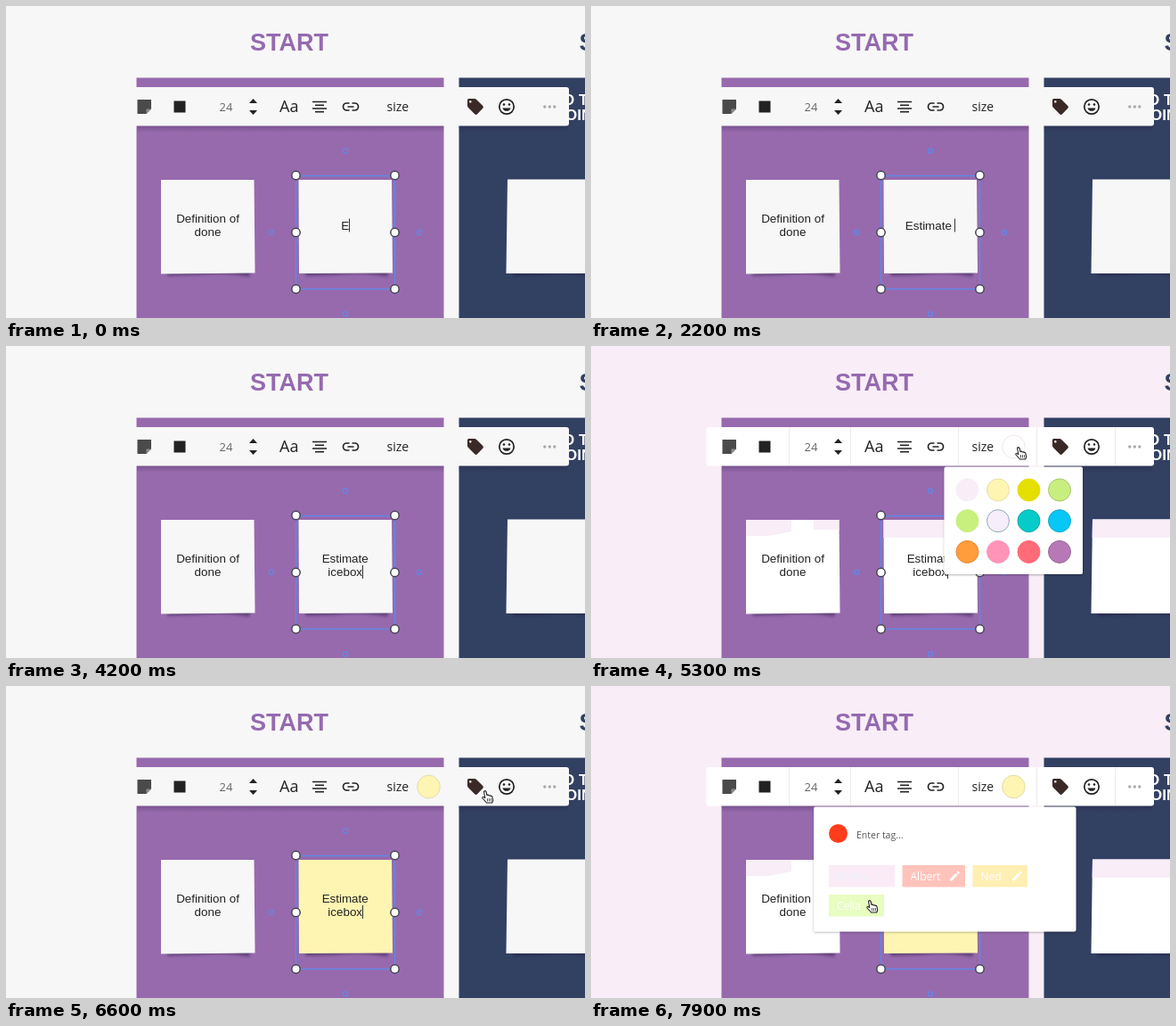
These frames come from a looping animation (650 by 350 pixels, 8 s). An HTML page:

```html
<!DOCTYPE html>
<html lang="en">
<head>
<meta charset="utf-8">
<title>Sticky notes board</title>
<style>
  html, body { margin: 0; width: 100%; height: 100%; overflow: hidden; background: #f7f7f7; }
  svg { display: block; width: 650px; height: 350px; }
  .note-text { font: 13.4px "Liberation Sans", Arial, sans-serif; fill: #222; text-anchor: middle; white-space: pre; }
  .heading { font: bold 27px "Liberation Sans", Arial, sans-serif; }
  .prompt { font: bold 17px "Liberation Sans", Arial, sans-serif; fill: #fff; }
  .ui { font-family: "Open Sans", "Noto Sans", sans-serif; }
  .tag { font-size: 12px; font-weight: 500; }
</style>
</head>
<body>
<svg viewBox="0 0 650 350" xmlns="http://www.w3.org/2000/svg">
  <defs>
    <filter id="soft" x="-20%" y="-100%" width="140%" height="300%"><feGaussianBlur stdDeviation="1.8"/></filter>
    <filter id="lift" x="-10%" y="-10%" width="120%" height="120%">
      <feDropShadow dx="0" dy="1" stdDeviation="1.3" flood-opacity=".3"/>
    </filter>
    <linearGradient id="fall" x2="0" y2="1">
      <stop stop-color="#201030" stop-opacity=".26"/><stop offset="1" stop-color="#201030" stop-opacity="0"/>
    </linearGradient>
    <path id="pencil" d="M-5 5v-2.3l6.5-6.5 2.3 2.3L-2.7 5zM2.3-4.5l1-1q.6-.5 1.2 0l1 1q.5.6 0 1.2l-1 1z"/>
    <path id="noteShadow" d="M4 98H102L99 109Q70 103 40 107L8 108Z" fill="#241238" opacity=".42" filter="url(#soft)"/>
  </defs>

  <rect id="page" width="650" height="350"/>
  <text class="heading" x="274" y="50" fill="#956ab0">START</text>
  <text class="heading" x="643.5" y="50" fill="#324062">STOP</text>
  <rect x="146.5" y="80.5" width="345" height="270" fill="#976aae"/>
  <rect x="508.5" y="80.5" width="142" height="270" fill="#324062"/>
  <text class="prompt" x="625" y="111">O T</text>
  <text class="prompt" x="628" y="128">OIN</text>

  <use href="#noteShadow" x="174" y="195"/>
  <use href="#noteShadow" x="329" y="195"/>
  <use href="#noteShadow" x="562" y="195"/>
  <g class="paper">
    <path d="M174 195H278.5L279.5 299.5 174 300.5Z"/>
    <path d="M563 194.5H660V300H561.5Z"/>
  </g>
  <path id="activeNote" d="M328.5 195H433L434 299.5 329 300Z"/>
  <g id="tint" fill="#f9edf7">
    <path d="M174 195H225V208L200 213H174Z"/>
    <path d="M250 195H278.5V206H250Z"/>
    <path id="activeTint" d="M328.5 195H397V215H328.5Z"/>
    <path d="M563 194.5H650V215H562.7Z"/>
  </g>
  <text class="note-text" x="226.5" y="243">Definition of</text>
  <text class="note-text" x="226.5" y="258">done</text>
  <text class="note-text" id="line1" x="380.7"></text>
  <text class="note-text" id="line2" x="380.7" y="258"></text>
  <path id="caret" stroke="#333"/>

  <g id="selection" fill="none" stroke="#5b8aea">
    <rect x="325.5" y="190.5" width="111" height="127" stroke-width="1.3"/>
  </g>

  <g id="shadow" fill="url(#fall)">
    <rect x="147" y="134" width="344.5" height="8"/>
    <rect x="508.5" y="134" width="122" height="8"/>
  </g>
  <rect class="paper" x="129.500" y="91" width="502.500" height="43.500" rx="3"/>
  <path id="dividers" d="M222.500 91V134M291.500 91V134M412.500 91V134M500.500 91V134M588.500 91V134" stroke="#eeeaee"/>
  <g fill="#222">
    <path d="M147.500 105H163V115.500L157.500 121H147.500Z" fill="#4a4a4a"/>
    <path d="M163 115.500H157.500V121Z" fill="#8c8c8c"/>
    <rect x="188.500" y="106.500" width="13" height="13"/>
    <path d="M273 109L277.500 104 282 109ZM273 117L277.500 122 282 117Z"/>
    <path d="M344 107.500H360M347 111.200H357M344 115H360M347 118.700H357" stroke="#222" stroke-width="1.6"/>
    <path d="M385.500 109H382.500A4 4 0 0 0 382.500 117H385.500M388.500 109H391.500A4 4 0 0 1 391.500 117H388.500M383.500 113H390.500" fill="none" stroke="#222" stroke-width="1.7"/>
    <path d="M519.500 104H526Q527.300 104 528.200 105L535.300 112Q536.600 113.400 535.300 114.800L529 121.300Q527.600 122.500 526.200 121.200L519 114Q518 113.200 518 112V105.500Q518 104 519.500 104ZM521.300 106A1.300 1.300 0 1 0 521.310 106Z" fill="#3a2926" fill-rule="evenodd"/>
    <circle cx="562" cy="113" r="8.200" fill="none" stroke="#222" stroke-width="1.700"/>
    <circle cx="559" cy="110.500" r="1.300"/><circle cx="565" cy="110.500" r="1.300"/>
    <path d="M557.500 114.500H566.500A4.700 4.700 0 0 1 557.500 114.500Z"/>
    <g fill="#aaa"><circle cx="604.800" cy="113" r="1.700"/><circle cx="610.300" cy="113" r="1.700"/><circle cx="615.800" cy="113" r="1.700"/></g>
  </g>
  <g class="ui" fill="#222">
    <text x="239.500" y="117.500" font-size="13" fill="#666">24</text>
    <text x="307" y="119" font-size="18">Aa</text>
    <text x="427.500" y="118" font-size="14">size</text>
  </g>
  <circle id="chosen" cx="474.500" cy="113" r="12.800"/>

  <g id="palette">
    <rect x="396.500" y="135.500" width="155.500" height="120.500" rx="2" fill="#fff" filter="url(#lift)"/>
  </g>

  <g id="tagPanel" class="ui">
    <rect x="250" y="135.500" width="294.500" height="140" rx="2" fill="#fff" filter="url(#lift)"/>
    <circle cx="277.500" cy="165.500" r="10.500" fill="#ff3d1c"/>
    <text x="298" y="171" font-size="10.500" fill="#555">Enter tag...</text>
  </g>

  <g id="hand" stroke-linejoin="round" stroke-linecap="round">
    <path d="M2.500 1.500Q3.700-.3 5 1.500L6 5.500Q7.400 4.500 8 6 9.300 5.200 10 6.500 11.800 6 12 7.800L12.700 11.500 11.700 14H5.500L1 9Q.3 7.300 2 7.500L3.800 8.600Z" fill="#fff" stroke="#222" stroke-width="1.1"/>
    <path d="M6.500 9.500V12M8.500 9.500V12M10.500 9.500V12" stroke="#222" stroke-width=".8"/>
  </g>
</svg>
<script>
const LOOP = 8000, STEP = 100;
const GREY = '#f7f7f7', PINK = '#f9edf7', YELLOW = '#fff5b2';
const PHRASE = 'Estimate icebox', WRAP_AT = 14;
const KEY_TIMES = [0, 500, 800, 1100, 1350, 1550, 1750, 1950, 2150, 2500, 2700, 2950, 3200, 3450, 3700];
const PALETTE = [5000, 6200], TAGS = [6900, LOOP], PICK = 5900, HAND_IN = 4500;

// Pointer stops: time, x, y
const STOPS = [
  [4500, 430, 195], [4900, 476, 113], [5400, 476, 113], [5800, 454, 158],
  [6000, 454, 158], [6600, 534, 117], [6900, 525, 114], [7100, 525, 114], [7800, 309, 240]
];

const el = id => document.getElementById(id);
const set = (node, attrs) => { for (const k in attrs) node.setAttribute(k, attrs[k]); };
const show = (id, on) => { el(id).style.display = on ? '' : 'none'; };
const within = (t, [from, to]) => t >= from && t < to;

function add(parent, name, attrs, text = '') {
  const node = document.createElementNS('http://www.w3.org/2000/svg', name);
  set(node, attrs);
  node.textContent = text;
  return el(parent).appendChild(node);
}

function build() {
  for (const [cx, cy] of [[381, 162.5], [298, 254], [464, 254], [381, 345.5]])
    add('selection', 'circle', { cx, cy, r: 2.6, 'stroke-width': 1.2 });
  for (const cx of [325.500, 436.500])
    for (const cy of [190, 254, 317.500])
      add('selection', 'circle', { cx, cy, r: 4.7, fill: '#fff', stroke: '#454550', 'stroke-width': 1.5 });

  const colors = ['#f9eef8', '#fff5b2', '#e5df00', '#c8ee7f', '#c7f07e', '#f6eefa',
    '#05ccc8', '#06c7f5', '#ff9c3c', '#ff93b8', '#ff6b78', '#b679b5'];
  const rims = { 1: '#e6dfa5', 3: '#a9c568', 5: '#8fabb9', 6: '#17a6a7', 7: '#16a5ce', 8: '#e58a33', 11: '#9c649c' };
  colors.forEach((fill, i) => add('palette', 'circle', {
    cx: 422.500 + i % 4 * 34.500, cy: 161.500 + Math.floor(i / 4) * 34.700, r: 12.5, fill, stroke: rims[i] || fill
  }));

  const tags = [
    ['Estella', 267, 201, 74, '#faebf6', '#e9f4f8', 0],
    ['Albert', 349.5, 201, 70.5, '#ffc3bb', '#fff', 1],
    ['Ned', 428.5, 201, 61.5, '#ffefb3', '#fff', .9],
    ['Celia', 267, 234, 62, '#e8fdc0', '#fff', 0]
  ];
  for (const [label, x, y, width, fill, ink, pencil] of tags) {
    add('tagPanel', 'rect', { x, y, width, height: 24.5, fill });
    add('tagPanel', 'text', { class: 'tag', x: x + 9, y: y + 16.5, fill: ink }, label);
    if (pencil) add('tagPanel', 'use', { href: '#pencil', x: x + width - 12, y: y + 12.5, fill: '#fff', opacity: pencil });
  }
}

function pointerAt(t) {
  const i = STOPS.findIndex(s => s[0] > t);
  if (i < 0) return STOPS[STOPS.length - 1].slice(1);
  if (i === 0) return STOPS[0].slice(1);
  const [a, b] = [STOPS[i - 1], STOPS[i]];
  const p = (t - a[0]) / (b[0] - a[0]), e = p * p * (3 - 2 * p);
  return [1, 2].map(k => a[k] + (b[k] - a[k]) * e);
}

function typeNote(t) {
  const typed = PHRASE.slice(0, KEY_TIMES.filter(k => k <= t).length);
  const wrapped = typed.length >= WRAP_AT;
  const first = wrapped ? 'Estimate' : typed, second = wrapped ? typed.slice(9) : '';
  el('line1').textContent = first;
  el('line2').textContent = second;
  set(el('line1'), { y: wrapped ? 243 : 250.5 });
  const last = wrapped ? el('line2') : el('line1');
  const x = Math.floor(380.7 + last.getComputedTextLength() / 2) + .5;
  set(el('caret'), { d: `M${x} ${wrapped ? 246 : 238.5}v15` });
}

function render(time) {
  const t = Math.floor(time % LOOP / STEP) * STEP;
  const palette = within(t, PALETTE), tagging = within(t, TAGS);
  const open = palette || tagging, picked = t >= PICK;
  const paper = open ? '#fff' : GREY;

  typeNote(t);
  set(el('page'), { fill: open ? PINK : GREY });
  document.querySelectorAll('.paper').forEach(n => set(n, { fill: paper }));
  set(el('activeNote'), { fill: picked ? YELLOW : paper });
  set(el('chosen'), { fill: picked ? YELLOW : paper, stroke: picked ? '#e3dba9' : open ? '#efe6ee' : GREY });
  show('dividers', open);
  show('tint', open);
  show('activeTint', !picked);
  show('palette', palette);
  show('tagPanel', tagging);
  show('hand', t >= HAND_IN);
  set(el('hand'), { transform: `translate(${pointerAt(t)})` });
}

build();
const start = performance.now();
function tick() {
  render(performance.now() - start);
  requestAnimationFrame(tick);
}
tick();
</script>
</body>
</html>
```
